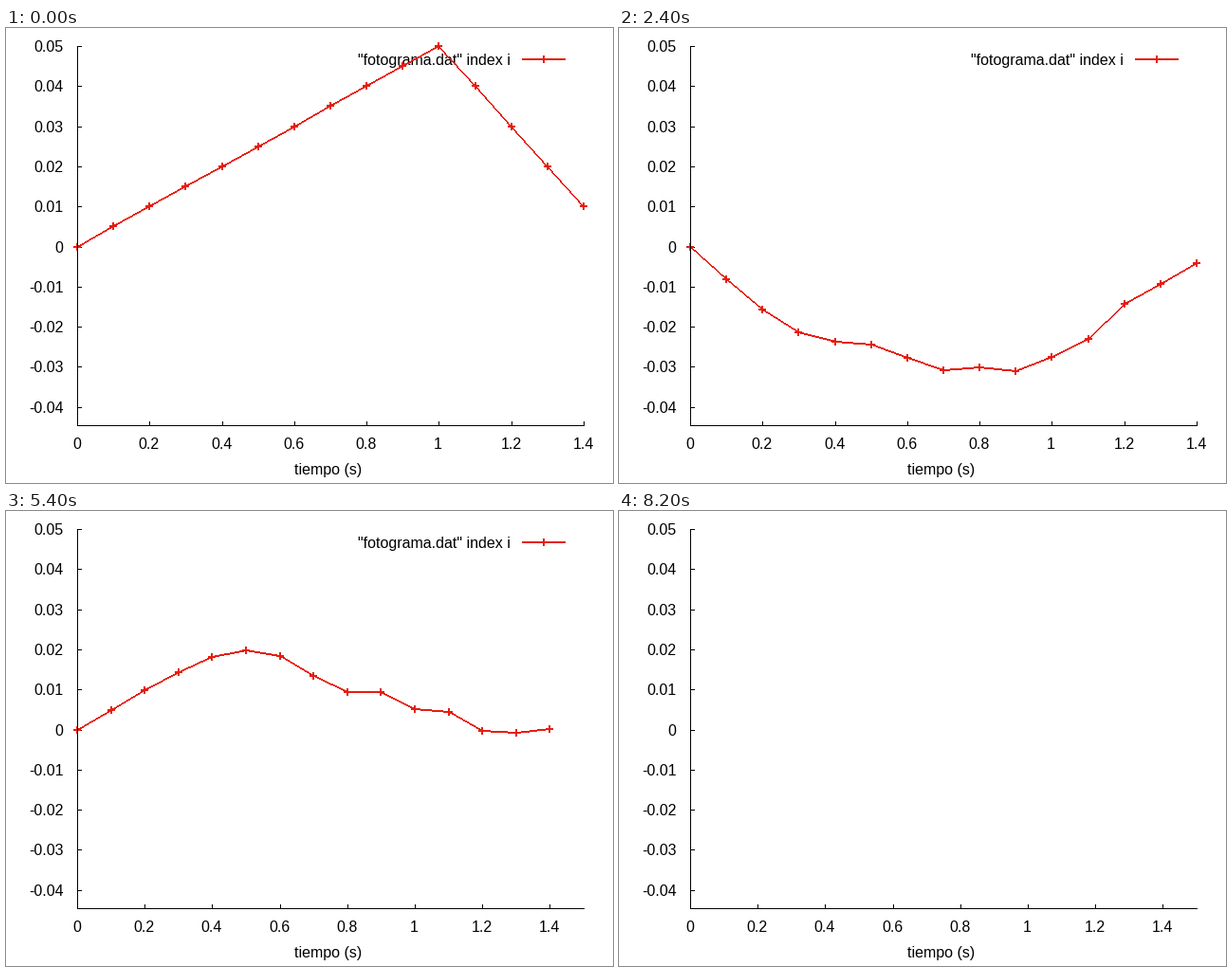
A matplotlib script that plays this animation: 640 px wide and 480 px high, repeating every 8.4 s.

```python
import numpy as np
import matplotlib.pyplot as plt
from matplotlib.animation import FuncAnimation
from matplotlib.collections import LineCollection

W, H, DPI = 640, 480, 100
PX = 72 / DPI                      # points per pixel
RED = "#e51e10"
LEFT, RIGHT, TOP, BOTTOM = 75, 609, 19, 419
Y_SCALE = 4231                     # pixels per unit of height
STEPS = 20                         # string shapes per run, then a blank plot
COURANT = 0.9825

plt.rcParams["font.family"] = "Liberation Sans"
plt.rcParams["font.size"] = 16 * PX


def string_shapes():
    """Plucked string with fixed ends, stepped by an implicit scheme."""
    i = np.arange(16)
    y = np.where(i <= 10, 0.005 * i, 0.01 * (15 - i))
    n = 14
    lap = np.eye(n, k=1) + np.eye(n, k=-1) - 2 * np.eye(n)
    a = COURANT ** 2 / 4
    half = np.linalg.solve(np.eye(n) - a * lap, np.eye(n) + a * lap)
    prev, cur = y[1:15], half @ y[1:15]
    shapes = [prev]
    while len(shapes) < STEPS:
        shapes.append(cur)
        prev, cur = cur, 2 * half @ cur - prev
    return [np.r_[0, s] for s in shapes]


def pixel(v):
    return np.floor(np.asarray(v) + 0.5)


def x_px(x, x_max):
    return pixel(LEFT + (RIGHT - LEFT) * np.asarray(x) / x_max)


def y_px(y):
    return pixel(TOP + (0.05 - np.asarray(y)) * Y_SCALE)


def pen_strokes(xs, ys):
    """Stepped two-pixel line: one short stroke across the path per pixel."""
    strokes = []
    for x0, y0, x1, y1 in zip(xs, ys, xs[1:], ys[1:]):
        flat = abs(x1 - x0) >= abs(y1 - y0)
        n = int(max(abs(x1 - x0), abs(y1 - y0))) + 1
        px, py = pixel(np.linspace(x0, x1, n)), pixel(np.linspace(y0, y1, n))
        for x, y in zip(px, py):
            strokes.append([(x + 0.5, y - 1), (x + 0.5, y + 1)] if flat
                           else [(x - 1, y + 0.5), (x + 1, y + 0.5)])
    return strokes


fig = plt.figure(figsize=(W / DPI, H / DPI), dpi=DPI, facecolor="white")
ax = fig.add_axes([0, 0, 1, 1])
ax.set_xlim(0, W)
ax.set_ylim(H, 0)
ax.axis("off")


def hairline(xs, ys, zorder=2):
    return ax.plot(xs, ys, color="black", lw=PX, snap=False,
                   solid_capstyle="butt", zorder=zorder)[0]


def label(x, y, text, ha):
    return ax.text(x, y, text, ha=ha, va="baseline", color="black")


def pen(strokes=()):
    lines = LineCollection(strokes, colors=RED, linewidths=PX,
                           capstyle="butt", snap=False, zorder=4)
    return ax.add_collection(lines, autolim=False)


def pluses(xs=(), ys=()):
    return ax.plot(xs, ys, "+", color=RED, markersize=8 * PX,
                   markeredgewidth=2 * PX, antialiased=False, zorder=4)[0]


# Borders lie over the curve, ticks under it
hairline([LEFT + 0.5] * 2, [TOP, BOTTOM + 1], zorder=5)
hairline([LEFT, RIGHT + 1], [BOTTOM + 0.5] * 2, zorder=5)
for k in range(-4, 6):
    y = float(y_px(k / 100))
    hairline([LEFT, LEFT + 5], [y + 0.5] * 2)
    label(60.5, y + 6, f"{k / 100:g}", "right")
label(339.5, 471, "tiempo (s)", "center")


def x_ticks(x_max):
    parts = []
    for k in range(8):
        x = float(x_px(k / 5, x_max))
        parts.append(hairline([x + 0.5] * 2, [BOTTOM - 4, BOTTOM + 1]))
        parts.append(label(x - 0.5, 444, f"{k / 5:g}", "center"))
    return parts


RANGES = (1.4, 1.5)
ticks = [x_ticks(m) for m in RANGES]

# Key and curve
key = [label(531.5, 39, '"fotograma.dat" index i', "right"),
       pen(pen_strokes([544, 589], [33, 33])),
       pluses([567], [33])]
curve, marks = pen(), pluses()

SHAPES = string_shapes()
X = np.arange(15) / 10


def update(frame):
    run, step = divmod(frame, STEPS + 1)
    for r, parts in enumerate(ticks):
        for p in parts:
            p.set_visible(r == run)
    shown = step < STEPS
    for p in key + [curve, marks]:
        p.set_visible(shown)
    if shown:
        xs, ys = x_px(X, RANGES[run]), y_px(SHAPES[step])
        curve.set_segments(pen_strokes(xs, ys))
        marks.set_data(xs, ys)
    return key + [curve, marks] + ticks[0] + ticks[1]


anim = FuncAnimation(fig, update, frames=2 * (STEPS + 1), interval=200,
                     repeat=True, repeat_delay=0, blit=False)
plt.show()
```
